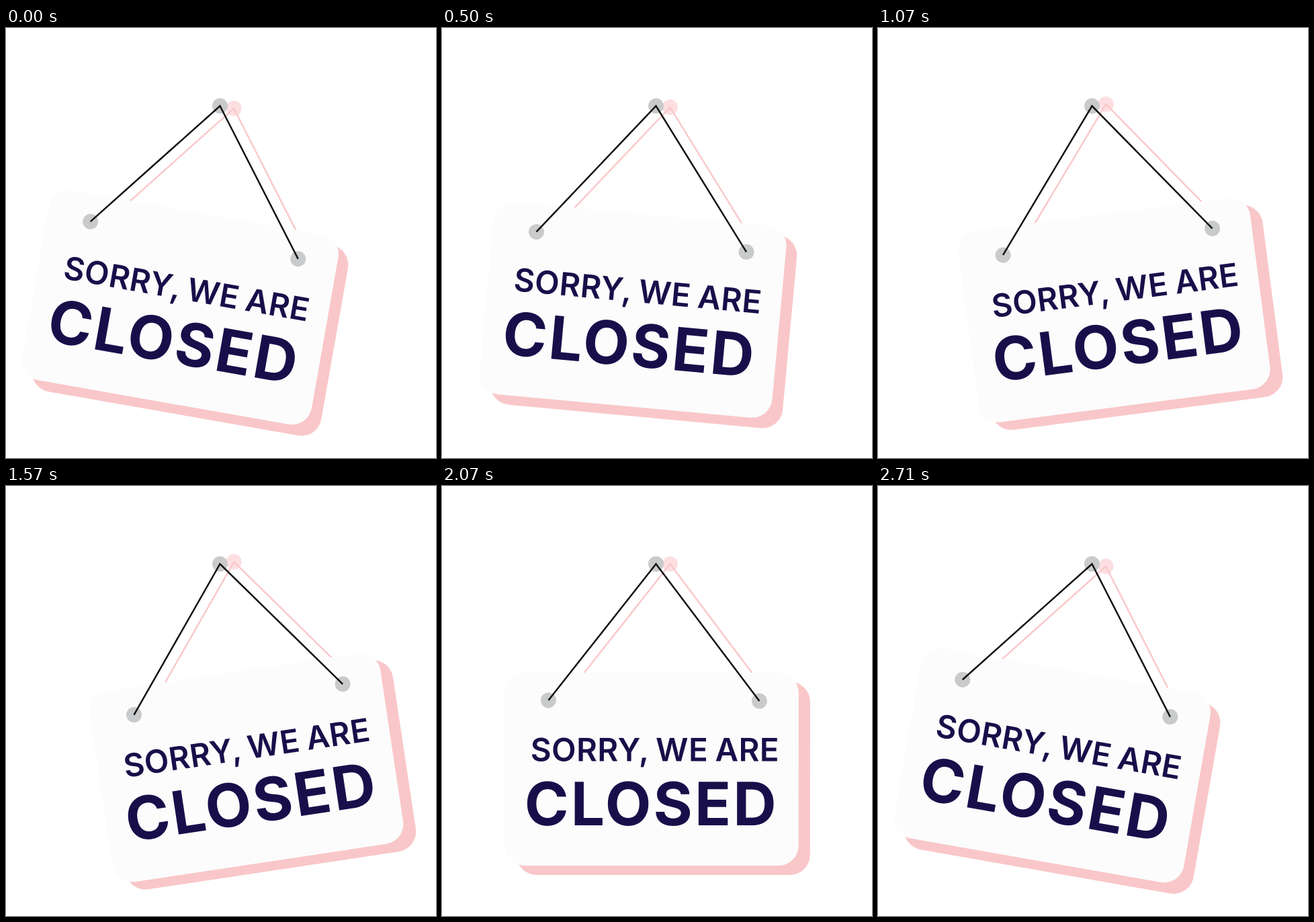
Animation, 640 px wide and 640 px high, one loop 2.78 s. Source, as an HTML page:

```html
<!DOCTYPE html>
<html lang="en">
<head>
<meta charset="utf-8">
<title>Swinging sign</title>
<style>
  html, body { margin: 0; height: 100%; overflow: hidden; background: #fff; }
  svg { display: block; width: 100%; height: 100%; }
  text {
    font-family: Inter, sans-serif;
    fill: #180f4a;
    text-anchor: middle;
    text-rendering: geometricPrecision;
  }
  .small { font-size: 47.5px; font-weight: 600; letter-spacing: 0.4px; word-spacing: -2px; }
  .large { font-size: 89px; font-weight: 650; letter-spacing: 3.2px; }
  .string { fill: none; stroke-width: 2.5; }
</style>
</head>
<body>
<svg viewBox="0 0 640 640">
  <g id="sign">
    <circle cx="339.5" cy="116" r="11.5" fill="#fddfe1"/>
    <path class="string" stroke="#fac9cb" d="M179.5 319 339.5 116 493 320"/>
    <rect x="111" y="291" width="437" height="288" rx="30" fill="#f9c7c9"/>
    <rect x="93.5" y="278" width="437.5" height="287" rx="30" fill="#fcfcfc"/>
    <g fill="#c9cacb">
      <circle cx="318.5" cy="116" r="11.5"/>
      <circle cx="158.5" cy="319" r="11.5"/>
      <circle cx="472.5" cy="320" r="11.5"/>
    </g>
    <path class="string" stroke="#111" d="M158.5 319 318.5 116 472.5 320"/>
    <text class="small" x="317" y="409.5">SORRY, WE ARE</text>
    <text class="large" x="312" y="505">CLOSED</text>
  </g>
</svg>
<script>
  const LOOP = 2780, STEP = 1000 / 14;
  const RIGHT = 10, LEFT = -9, POWER = 2.2;
  const sign = document.getElementById('sign');

  function ease(p) {
    p = Math.min(1, Math.max(0, p));
    return p < 0.5 ? (2 * p) ** POWER / 2 : 1 - (2 - 2 * p) ** POWER / 2;
  }

  function angleAt(t) {
    const away = ease(t / 1375);
    const back = ease((t - 1402) / 1370);
    return RIGHT + (LEFT - RIGHT) * (away - back);
  }

  function draw(now) {
    // The swing advances 14 times a second, on a 10 ms clock.
    const clock = Math.floor((now % LOOP) / 10) * 10;
    const t = Math.floor((clock + 5) / STEP) * STEP;
    sign.setAttribute('transform', `rotate(${angleAt(t)} 318.5 116)`);
    requestAnimationFrame(draw);
  }

  draw(0);
</script>
</body>
</html>
```
